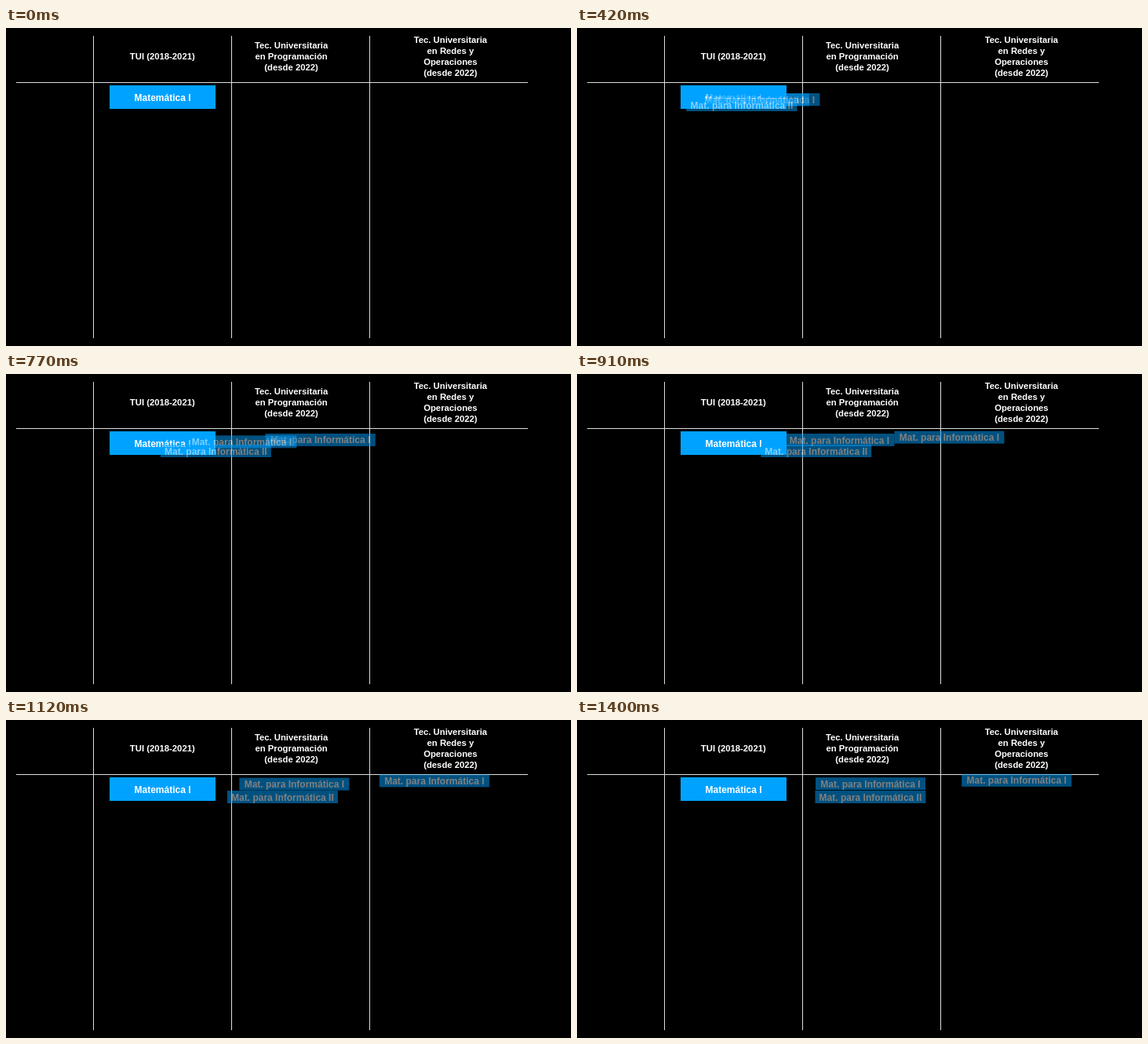
Recreate the animation shown at these times as an HTML page. Size 720 px wide and 405 px high, loop 1960 ms.

```html
<!DOCTYPE html>
<html lang="es">
<head>
<meta charset="utf-8">
<style>
  html, body { margin: 0; width: 100%; height: 100%; overflow: hidden; background: #000; }
  svg { display: block; width: 100%; height: 100%; }
  text { font: bold 12px "Liberation Sans", Arial, sans-serif; fill: #fff; text-anchor: middle; }
  .heading { font-size: 11.3px; }
  .grid { fill: #ddd; }
  .course { fill: #00a2ff; }
</style>
</head>
<body>
<svg id="stage" viewBox="0 0 720 405"></svg>
<script>
const LOOP = 1960, STEP = 70, LAST_MOVE = 1400, MOVE_TIME = 1156;
const stage = document.getElementById('stage');

function add(parent, tag, attrs, content = '') {
  const el = document.createElementNS('http://www.w3.org/2000/svg', tag);
  for (const name in attrs) el.setAttribute(name, attrs[name]);
  el.textContent = content;
  return parent.appendChild(el);
}

function box(parent, kind, x, y, width, height) {
  add(parent, 'rect', { class: kind, x, y, width, height });
}

function heading(x, baseline, lines) {
  lines.forEach((line, i) =>
    add(stage, 'text', { class: 'heading', x, y: baseline + 14 * i }, line));
}

for (const x of [111, 287, 463]) box(stage, 'grid', x, 10, 1, 385);
box(stage, 'grid', 13, 69, 652, 1);

heading(199.3, 40, ['TUI (2018-2021)']);
heading(363.6, 26, ['Tec. Universitaria', 'en Programación', '(desde 2022)']);
heading(566.4, 19, ['Tec. Universitaria', 'en Redes y', 'Operaciones', '(desde 2022)']);

box(stage, 'course', 132, 73, 135, 30);
add(stage, 'text', { x: 199.5, y: 92.5 }, 'Matemática I');

const chips = [
  { label: 'Mat. para Informática I', width: 140, from: [144.3, 84.2], to: [490.2, 68.8], shown: 140, start: 168 },
  { label: 'Mat. para Informática I', width: 140, from: [144.3, 84.2], to: [304, 73.2], shown: 140, start: 168 },
  { label: 'Mat. para Informática II', width: 141, from: [137, 90], to: [303.5, 90], shown: 350, start: 280 },
];
for (const chip of chips) {
  chip.el = add(stage, 'g', { opacity: 0.5 });
  box(chip.el, 'course', 0, 0, chip.width, 16);
  add(chip.el, 'text', { x: chip.width / 2, y: 12.6 }, chip.label);
}

const clamp = u => Math.min(1, Math.max(0, u));
const ease = u => u ** 3 * (u * (6 * u - 15) + 10);

function draw(now) {
  const t = Math.min(LAST_MOVE, Math.floor((now % LOOP) / STEP) * STEP);
  for (const { el, from, to, shown, start } of chips) {
    const s = ease(clamp((t - start) / MOVE_TIME));
    const [x, y] = from.map((a, i) => a + (to[i] - a) * s);
    el.setAttribute('visibility', t >= shown ? 'visible' : 'hidden');
    el.setAttribute('transform', `translate(${x} ${y})`);
  }
}

const begin = performance.now();
function tick() {
  draw(performance.now() - begin);
  requestAnimationFrame(tick);
}
tick();
</script>
</body>
</html>
```
